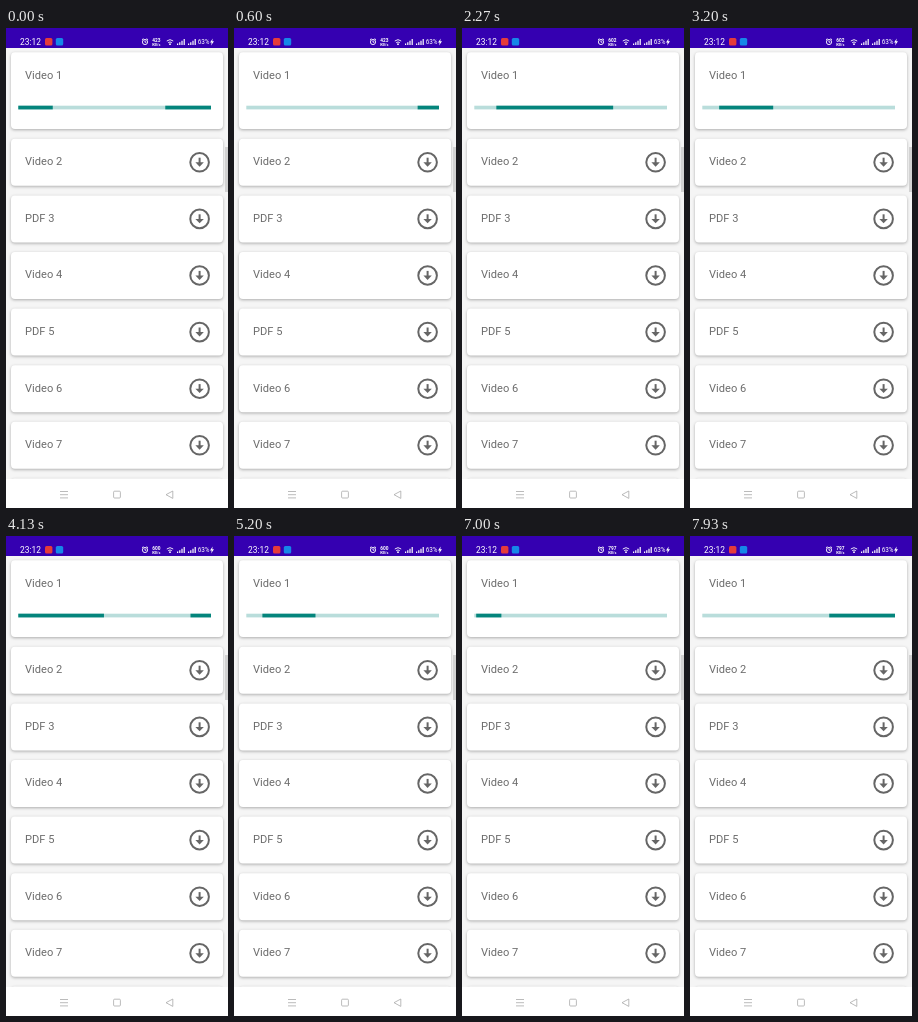
Write an HTML page that moves like this. It is 222 by 480 pixels and loops after 8 s.

```html
<!DOCTYPE html>
<html lang="en">
<head>
<meta charset="utf-8">
<title>Download list</title>
<style>
  html, body { margin: 0; width: 100%; height: 100%; overflow: hidden; background: #fff; }
  svg { display: block; width: 100%; height: 100%; }
  text { font-family: Roboto, sans-serif; }
  .card { fill: #fff; filter: drop-shadow(0 1.6px 1.8px rgba(0, 0, 0, .3)); }
  .title { font-size: 11.1px; fill: #6c6c6c; }
  .status { fill: #fff; }
  .line { fill: none; stroke: #fff; stroke-width: .9; }
  .nav { fill: none; stroke: #aaa; stroke-width: .8; }
</style>
</head>
<body>
<svg viewBox="0 0 222 480">
  <defs>
    <g id="download" fill="none" stroke="#666" stroke-width="2">
      <circle r="9.3"/>
      <path d="M0-4.6V1"/>
      <path d="M-4.2 0H4.2L0 4.4Z" fill="#666" stroke="none"/>
    </g>
    <path id="signal" d="M0 6V4.5H1.2V6ZM2.2 6V3.2H3.4V6ZM4.4 6V1.7H5.6V6ZM6.6 6V0H7.8V6Z"/>
  </defs>

  <rect width="222" height="452" fill="#f5f5f5"/>
  <g id="cards"></g>
  <rect x="219" y="119" width="3" height="45" fill="#d2d2d2"/>

  <rect x="12.3" y="77.7" width="192.7" height="3.7" fill="#b9dddb"/>
  <g fill="#04857c">
    <rect class="segment" y="77.7" height="3.7"/>
    <rect class="segment" y="77.7" height="3.7"/>
  </g>

  <rect width="222" height="20" fill="#3500b1"/>
  <g class="status">
    <text x="14" y="17" font-size="8.4">23:12</text>
    <rect x="39" y="10" width="7.4" height="7.4" rx="1.5" fill="#e63b3a"/>
    <rect x="49.8" y="10" width="7.4" height="7.4" rx="1.5" fill="#1687e8"/>
    <g class="line">
      <circle cx="139" cy="14" r="2.6"/>
      <path d="M139 12.4V14.2H140.3M136 11.8L137.4 10.6M142 11.8L140.6 10.6"/>
      <path d="M160.8 13Q164 10.3 167.2 13M162.2 14.7Q164 13.2 165.8 14.7"/>
    </g>
    <circle cx="164" cy="16.2" r=".9"/>
    <g text-anchor="middle" font-weight="700">
      <text id="speed" x="150.3" y="13.7" font-size="4.8"></text>
      <text x="150.3" y="17.6" font-size="3.8">KB/s</text>
    </g>
    <use href="#signal" x="171" y="11"/>
    <use href="#signal" x="182" y="11"/>
    <text x="191.7" y="16.4" font-size="6.4">63%</text>
    <path d="M206.8 10.5L204 14.4H205.7L205 17.4L208 13.3H206.2Z"/>
  </g>

  <rect y="451" width="222" height="29" fill="#fff"/>
  <g class="nav">
    <path d="M54 463.5H62M54 466.7H62M54 469.9H62"/>
    <rect x="107.6" y="463.2" width="6.8" height="6.8" rx="1"/>
    <path d="M166.8 463V470.4L160 466.7Z"/>
  </g>
</svg>

<script>
const LOOP = 8000, STEP = LOOP / 120, CYCLE = 2008;
const BAR_X = 12.3, BAR_WIDTH = 192.7;
const SPEEDS = [[0, "423"], [2130, "602"], [4130, "600"], [6270, "797"]];

const card = (y, height) => `<rect class="card" x="5" y="${y}" width="212" height="${height}" rx="4"/>`;
const title = (name, y) => `<text class="title" x="19" y="${y}">${name}</text>`;
let markup = card(24.3, 76.7) + title("Video 1", 51);
["Video 2", "PDF 3", "Video 4", "PDF 5", "Video 6", "Video 7"].forEach((name, i) => {
  const y = 110.8 + i * 56.6;
  markup += card(y, 47) + title(name, y + 26.4) + `<use href="#download" x="193.6" y="${y + 23.5}"/>`;
});
document.getElementById("cards").innerHTML = markup + card(450.4, 47);

function bezier(x1, y1, x2, y2) {
  const at = (a, b, s) => 3 * a * s * (1 - s) ** 2 + 3 * b * s * s * (1 - s) + s ** 3;
  return x => {
    if (x <= 0) return 0;
    if (x >= 1) return 1;
    let low = 0, high = 1;
    for (let i = 0; i < 24; i++) {
      const mid = (low + high) / 2;
      if (at(x1, x2, mid) < x) low = mid; else high = mid;
    }
    return at(y1, y2, low);
  };
}

// Each edge crosses the bar once per cycle.
const edge = (start, duration, ease) => time => ease((time - start) / duration);
const segments = [
  { from: 800,
    head: edge(800, 940, bezier(.2, .1, .6, .57)),
    tail: edge(880, 1335, bezier(.4, 0, 1, 1)) },
  { from: 1936,
    head: edge(1936, 585, bezier(0, 0, .65, 1)),
    tail: edge(2211, 580, bezier(.1, 0, .45, 1)) }
];
const bars = document.querySelectorAll(".segment");
const speed = document.getElementById("speed");

function draw(now) {
  const loopTime = now % LOOP;
  const time = Math.floor((loopTime + 4) / STEP) * STEP % LOOP;
  segments.forEach(({ from, head, tail }, i) => {
    const local = from + (time - from + 2 * CYCLE) % CYCLE;
    const start = tail(local);
    bars[i].setAttribute("x", BAR_X + BAR_WIDTH * start);
    bars[i].setAttribute("width", BAR_WIDTH * Math.max(0, head(local) - start));
  });
  speed.textContent = SPEEDS.findLast(([since]) => time + 4 >= since)[1];
}

const begin = performance.now();
function tick() {
  draw(performance.now() - begin);
  requestAnimationFrame(tick);
}
tick();
</script>
</body>
</html>
```
